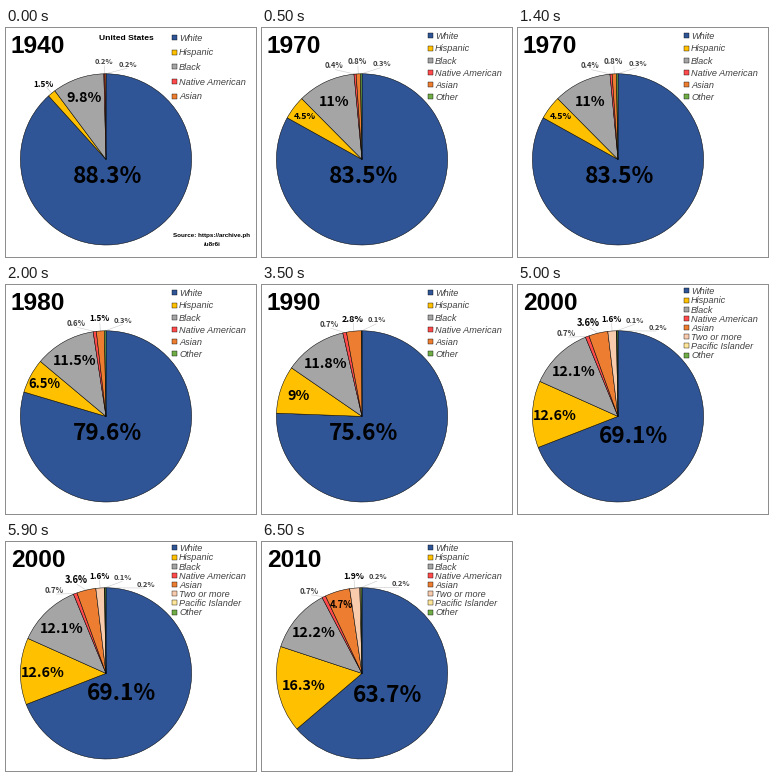
A matplotlib script that plays this animation: 250 by 229 pixels, repeating every 8 s.

```python
import numpy as np
import matplotlib.pyplot as plt
from matplotlib.animation import FuncAnimation
from matplotlib.patches import Rectangle, Wedge

W, H, DPI = 250, 229, 100
CX, CY, RADIUS = 100, 131.4, 85.6
STEP, HOLD, LEAD_IN = 500, 1500, 1000
FAN_GAP = 14  # degrees between neighbouring outside labels

COLORS = {
    "White": "#2F5597", "Hispanic": "#FFC000", "Black": "#A5A5A5",
    "Native American": "#FF4B4B", "Asian": "#ED7D31",
    "Two or more": "#F8CBAD", "Pacific Islander": "#FFE699",
    "Other": "#70AD47",
}
NAMES = list(COLORS)

SHARES = {
    1940: [88.3, 1.5, 9.8, 0.2, 0.2],
    1970: [83.5, 4.5, 11, 0.4, 0.8, 0.3],
    1980: [79.6, 6.5, 11.5, 0.6, 1.5, 0.3],
    1990: [75.6, 9, 11.8, 0.7, 2.8, 0.1],
    2000: [69.1, 12.6, 12.1, 0.7, 3.6, 1.6, 0.1, 0.2],
    2010: [63.7, 16.3, 12.2, 0.7, 4.7, 1.9, 0.2, 0.2],
}
YEARS = list(SHARES)

fig = plt.figure(figsize=(W / DPI, H / DPI), dpi=DPI, facecolor="white")
ax = fig.add_axes([0, 0, 1, 1])


def px(n):
    return n * 72 / DPI


def text(s, x, y, size, ha="center", font="Liberation Sans", weight="bold", **kw):
    ax.text(x, y + 0.35 * size, s, fontsize=px(size), ha=ha, va="baseline",
            family=font, weight=weight, **kw)


def polar(angle, r):
    """Point at a clockwise angle from the top of the pie."""
    a = np.radians(angle)
    return CX + r * np.sin(a), CY - r * np.cos(a)


def group_names(n):
    return NAMES if n == len(NAMES) else (NAMES[:5] + ["Other"])[:n]


def fan_out(mids):
    """Push label angles apart, left and right of a fixed slice near the top."""
    angles = list(mids)
    n = len(angles)
    fixed = n - (n + 1) // 3
    for k in range(fixed - 1, -1, -1):
        angles[k] = min(angles[k], angles[k + 1] - FAN_GAP)
    for k in range(fixed + 1, n):
        angles[k] = max(angles[k], angles[k - 1] + FAN_GAP)
    return angles


def draw_label(share, mid, angle):
    color = "black"
    if share > 50:
        # The main label drifts right once its slice is under three quarters.
        drift = max(0, 75.6 - share)
        x, y, size = 102 + 2 * drift, 147 + 0.4 * drift, 22.7
    elif share > 4:
        x, y = polar(mid, 77 - 1.1 * share)
        size = min(14.3, 2 * share)
    else:
        x, y = polar(angle, 98)
        size = 7.4 + 0.55 * share
        color = "black" if share > 1 else "#404040"
        ends = zip(polar(angle, 93.5), polar(mid, RADIUS))
        ax.plot(*ends, color="#CCCCCC", lw=px(0.6), zorder=0)
    text(f"{share:g}%", x, y, size, font="Noto Sans CJK JP", color=color)


def draw_pie(shares):
    ends = 360 * np.cumsum(shares) / sum(shares) - 360
    starts = np.r_[-360, ends[:-1]]
    mids = (starts + ends) / 2
    for name, a, b in zip(group_names(len(shares)), starts, ends):
        ax.add_patch(Wedge((CX, CY), RADIUS, a - 90, b - 90, fc=COLORS[name],
                           ec="black", lw=px(0.5), joinstyle="round"))
    for label in zip(shares, mids, fan_out(mids)):
        draw_label(*label)


def draw_legend(names):
    gap = 73.3 / len(names)
    for k, name in enumerate(names):
        y = gap * (k + 0.64)
        ax.add_patch(Rectangle((166, y - 2.5), 5, 5, fc=COLORS[name],
                               ec="black", lw=px(0.4)))
        text(name, 173, y + 0.2, 9.1, ha="left", weight="normal",
             style="italic", color="#404040")


def draw(i):
    year = YEARS[(i * STEP + LEAD_IN) // HOLD]
    shares = SHARES[year]
    ax.clear()
    ax.set(xlim=(0, W), ylim=(H, 0))
    ax.axis("off")
    draw_pie(shares)
    draw_legend(group_names(len(shares)))
    text(year, 32, 16.5, 24.5)
    if year == YEARS[0]:
        text("United States", 120, 9, 8.5)
        text("Source: https://archive.ph", 205.5, 207, 6.3)
        text("/u8r6i", 206, 215.5, 6.3)
    return []


anim = FuncAnimation(fig, draw, frames=16, init_func=lambda: [],
                     interval=STEP, repeat=True, repeat_delay=0)
plt.show()
```
